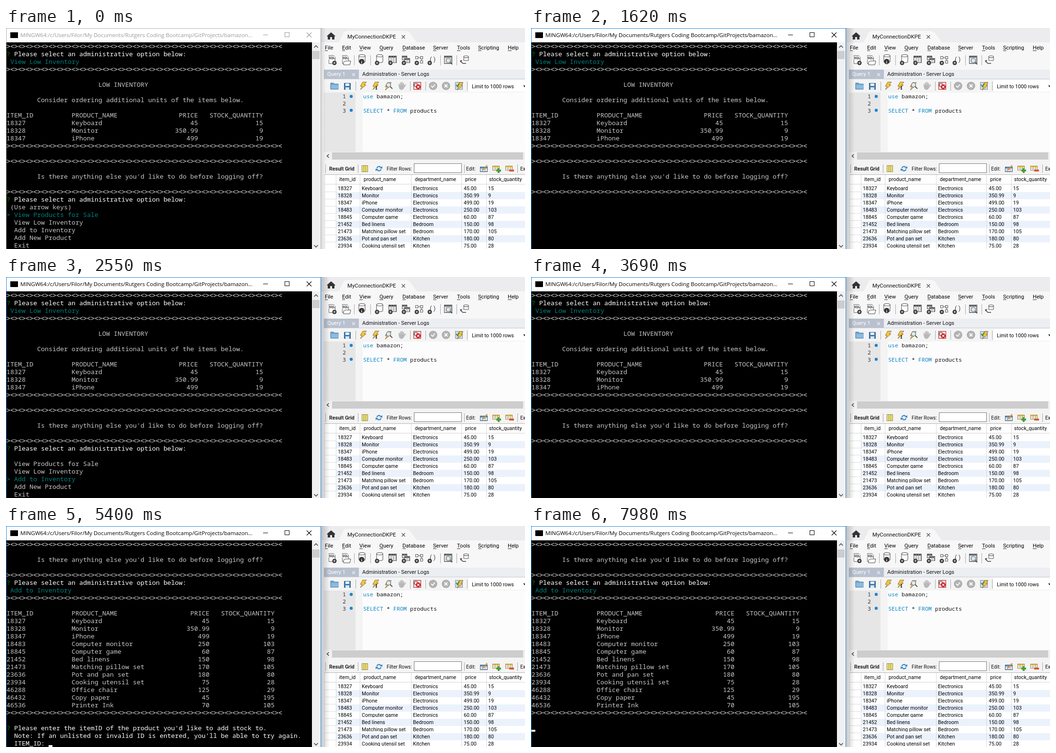
An HTML page with a canvas for the animation above (8 s loop, 1084x462 px).

```html
<!DOCTYPE html>
<html lang="en">
<head>
<meta charset="utf-8">
<title>Inventory console</title>
<style>
html, body { margin: 0; width: 100%; height: 100%; overflow: hidden; background: #fff; }
canvas { display: block; }
</style>
</head>
<body>
<canvas id="stage" width="1084" height="462"></canvas>
<script>
const W = 1084, H = 462, LOOP = 8000;
const stage = document.getElementById('stage').getContext('2d');
let c = stage;

const UI = '11.15px Roboto, sans-serif';
const GRID = '10.6px Roboto, sans-serif';
const CODE = '11.67px "Noto Sans Mono", monospace';
const TERM = '500 13.333px "Noto Sans Mono", monospace';
const RULE = '13.29px "DejaVu Sans Mono", monospace';
const GREY = '#c8c8c8', WHITE = '#fff', TEAL = '#008080', GREEN = '#008000';

const items = [
  ['18327', 'Keyboard', 'Electronics', '45', '15'],
  ['18328', 'Monitor', 'Electronics', '350.99', '9'],
  ['18347', 'iPhone', 'Electronics', '499', '19'],
  ['18483', 'Computer monitor', 'Electronics', '250', '103'],
  ['18845', 'Computer game', 'Electronics', '60', '87'],
  ['21452', 'Bed linens', 'Bedroom', '150', '98'],
  ['21473', 'Matching pillow set', 'Bedroom', '170', '105'],
  ['23636', 'Pot and pan set', 'Kitchen', '180', '80'],
  ['23934', 'Cooking utensil set', 'Kitchen', '75', '28'],
  ['46288', 'Office chair', 'Office', '125', '29'],
  ['46432', 'Copy paper', 'Office', '45', '195'],
  ['46536', 'Printer Ink', 'Office', '70', '105']
];
const options = ['View Products for Sale', 'View Low Inventory', 'Add to Inventory', 'Add New Product', 'Exit'];

function rect(x, y, w, h, fill) { c.fillStyle = fill; c.fillRect(x, y, w, h); }
function box(x, y, w, h, stroke, fill) {
  if (fill) rect(x, y, w, h, fill);
  c.strokeStyle = stroke; c.lineWidth = 1;
  c.strokeRect(x + .5, y + .5, w - 1, h - 1);
}
function text(s, x, y, font, fill) { c.font = font; c.fillStyle = fill; c.fillText(s, x, y); }
function line(points, stroke, width = 1) {
  c.strokeStyle = stroke; c.lineWidth = width; c.beginPath();
  points.forEach(([x, y], i) => i ? c.lineTo(x, y) : c.moveTo(x, y));
  c.stroke();
}
function poly(points, fill, stroke) {
  c.beginPath();
  points.forEach(([x, y], i) => i ? c.lineTo(x, y) : c.moveTo(x, y));
  c.closePath(); c.fillStyle = fill; c.fill();
  if (stroke) { c.strokeStyle = stroke; c.lineWidth = 1; c.stroke(); }
}
function disc(x, y, r, fill, stroke) {
  c.beginPath(); c.arc(x, y, r, 0, 7);
  if (fill) { c.fillStyle = fill; c.fill(); }
  if (stroke) { c.strokeStyle = stroke; c.lineWidth = 1.2; c.stroke(); }
}
function cross(x, y, r, stroke, width = 1) {
  line([[x - r, y - r], [x + r, y + r]], stroke, width);
  line([[x + r, y - r], [x - r, y + r]], stroke, width);
}
function divider(x, y, h) { rect(x, y, 1, h, '#a9a9a9'); }

// Toolbar icons, each centred on x, y
function badge(x, y) {
  disc(x, y, 4.5, '#333');
  rect(x - 2.5, y - .5, 5, 1, WHITE); rect(x - .5, y - 2.5, 1, 5, WHITE);
}
function sheet(x, y) {
  poly([[x - 6.5, y - 9.5], [x + 3.5, y - 9.5], [x + 6.5, y - 6.5], [x + 6.5, y + 7.5], [x - 6.5, y + 7.5]], WHITE, '#666');
  rect(x - 8, y - 8, 14, 7, '#f7f7f8');
  text('SQL', x - 7, y - 2, 'bold 7px Roboto, sans-serif', '#333');
}
function cylinder(x, y) {
  rect(x - 6, y - 7, 13, 13, WHITE);
  c.strokeStyle = '#555'; c.lineWidth = 1.1;
  c.beginPath(); c.ellipse(x + .5, y - 7, 6.5, 2.5, 0, 0, 7); c.stroke();
  c.beginPath(); c.moveTo(x - 6, y - 7); c.lineTo(x - 6, y + 5);
  c.ellipse(x + .5, y + 5, 6.5, 2.5, 0, Math.PI, 0, true); c.lineTo(x + 7, y - 7); c.stroke();
}
function table(x, y, w, h, head, edge) {
  box(x, y, w, h, edge, WHITE);
  rect(x + 1, y + 1, w - 2, 3, head);
  for (let j = 6; j < h - 1; j += 3) rect(x + 1, y + j, w - 2, 1, '#aaa');
  for (let i = 5; i < w - 1; i += 5) rect(x + i, y + 1, 1, h - 2, '#999');
}
function bolt(x, y) {
  poly([[x - 1, y - 8], [x + 7, y - 8], [x + 2, y - 2], [x + 6, y - 2], [x - 6, y + 8], [x - 2, y + 1], [x - 6, y + 1]], '#f8c537', '#8a7340');
}
function lens(x, y) {
  disc(x, y, 4.5, '#d8ecf8', '#666');
  line([[x + 3, y + 3], [x + 8, y + 8]], '#555', 2);
}
function refresh(x, y) {
  c.strokeStyle = '#2f83c5'; c.lineWidth = 2.2;
  c.beginPath(); c.arc(x, y, 4.5, 3.4, 5.5); c.stroke();
  c.beginPath(); c.arc(x, y, 4.5, .3, 2.4); c.stroke();
  poly([[x + 1, y - 1], [x + 7, y - 5], [x + 7, y]], '#2f83c5');
  poly([[x - 1, y + 1], [x - 7, y + 5], [x - 7, y]], '#2f83c5');
}

function drawHeader() {
  rect(658, 0, 426, 30, '#ececef');
  poly([[695, 30], [706, 8], [712, 6], [836, 6], [843, 9], [858, 30]], '#f7f7f8');
  poly([[670, 17], [679, 9], [688, 17], [686, 18], [686, 24], [681, 24], [681, 19], [677, 19], [677, 24], [672, 24], [672, 18]], '#333');
  text('MyConnectionDKPE', 713, 22, '11.4px Roboto, sans-serif', '#111');
  cross(830, 18.5, 3.5, '#555', 1.2);

  rect(664, 30, 420, 57, '#f7f7f8');
  const menu = { File: 666, Edit: 702, View: 738, Query: 780, Database: 828, Server: 892, Tools: 942, Scripting: 986, Help: 1048 };
  for (const [name, x] of Object.entries(menu)) {
    text(name, x, 45, UI, '#000');
    rect(x, 47, Math.round(c.measureText(name[0]).width), 1, '#333');
  }

  sheet(681, 67); badge(686, 73);
  sheet(709, 67);
  poly([[705, 71], [709, 69], [720, 69], [718, 77], [705, 77]], WHITE, '#444');
  [727, 761, 907, 941].forEach(x => divider(x, 57, 21));
  cylinder(743, 65); disc(743, 70, 5.5, '#333');
  text('i', 741.6, 74, 'bold 9px Liberation Serif, serif', WHITE);
  cylinder(780, 65); badge(775, 73);
  table(799, 58, 17, 15, '#555', '#555'); badge(803, 73);
  table(827, 58, 11, 9, '#666', '#555'); table(832, 63, 12, 10, '#666', '#555'); badge(831, 73);
  [[855, 59], [865, 59], [865, 68]].forEach(([x, y]) => box(x, y, 6, 6, '#555', WHITE));
  line([[861, 62], [865, 62]], '#555'); line([[868, 65], [868, 68]], '#555'); badge(858, 73);
  text('( )', 885, 70, '13px Roboto, sans-serif', '#444'); badge(885, 73);
  table(915, 58, 17, 17, '#666', '#555'); lens(924, 68);
  c.strokeStyle = '#555'; c.lineWidth = 1.1;
  c.beginPath(); c.ellipse(961, 60, 5, 2, 0, 0, 7); c.stroke();
  line([[956, 60], [956, 68], [966, 68], [966, 60]], '#555');
  line([[950, 70], [954, 74], [961, 74]], '#444', 1.6);
  poly([[948, 68], [953, 67], [950, 72]], '#444');
}

function drawEditor() {
  rect(664, 87, 420, 20, '#eceef2');
  rect(664, 87, 73, 19, '#b9c1cf');
  text('Query 1', 671, 100, UI, WHITE);
  cross(726, 97.5, 3, '#eef0f4', 1.2);
  text('Administration - Server Logs', 744, 100, UI, '#111');
  rect(664, 106, 420, 29, '#f4f4f5');
  rect(664, 106, 420, 1, '#c9cdd5');

  poly([[678, 115], [684, 115], [686, 117], [694, 117], [694, 128], [678, 128]], '#6fa6cf', '#4c7fa8');
  rect(679, 119, 15, 8, '#8bbcdf');
  box(706, 115, 14, 14, '#2d5f8c', '#3f7eb3');
  rect(709, 116, 8, 5, WHITE); rect(709, 124, 8, 5, '#d8e6f0');
  [730, 844, 876, 963].forEach(x => divider(x, 112, 19));
  bolt(746, 121);
  bolt(772, 121); text('I', 771, 129, 'bold 13px Liberation Serif, serif', '#333');
  bolt(798, 122); lens(799, 119);
  c.lineCap = 'round';
  [[821, 118], [824, 115], [827, 114], [830, 116]].forEach(([x, y]) => line([[x, y], [x + .5, 123]], '#b8b8b8', 2.4));
  line([[834, 119], [830, 125]], '#b8b8b8', 2.4);
  c.lineCap = 'butt';
  disc(826, 124, 5.2, '#b8b8b8');
  box(851, 113, 16, 16, '#a22', '#f5dcdc');
  disc(856, 119, 3.5, null, '#444'); disc(861, 123, 5, '#d3222a');
  cross(861, 123, 2, WHITE, 1.4);
  disc(892, 121, 8, '#b5b5b5', '#9b9b9b');
  line([[888, 121], [891, 124], [896, 118]], WHITE, 1.8);
  disc(919, 121, 8, '#b5b5b5', '#9b9b9b'); cross(919, 121, 3, WHITE, 1.8);
  box(938, 113, 16, 16, '#8796a5', '#c6d8e6'); bolt(948, 122);
  line([[940, 119], [943, 122], [947, 116]], '#3d7f39', 1.8);
  rect(966, 109, 118, 24, WHITE);
  text('Limit to 1000 rows', 973, 126, '10.6px Roboto, sans-serif', '#000');
  poly([[1080, 120], [1087, 120], [1083.5, 124]], '#333');

  rect(664, 135, 420, 125, '#fcfcfc');
  rect(664, 135, 66, 124, '#e6e6e6');
  rect(730, 135, 15, 124, '#f4f4f4');
  ['1', '2', '3'].forEach((n, i) => text(n, 703, 147 + 15 * i, CODE, '#333'));
  disc(721, 143, 3.2, '#1c86d1'); disc(721, 172, 3.2, '#1c86d1');
  const code = (s, col, row, fill) => text(s, 746 + 7 * col, 147 + 15 * row, CODE, fill);
  code('use', 0, 0, '#0b84c6'); code('bamazon;', 4, 0, '#111');
  code('SELECT', 0, 2, '#0b84c6'); code('*', 7, 2, '#111');
  code('FROM', 9, 2, '#0b84c6'); code('products', 14, 2, '#111');

  rect(664, 259, 420, 17, '#f0f0f0');
  rect(681, 260, 399, 15, '#cdcdcd');
  line([[674.5, 264], [670.5, 267.5], [674.5, 271]], '#444', 1.6);
}

function drawResults() {
  rect(664, 276, 420, 30, '#f4f4f5');
  [667, 735, 957, 1068].forEach(x => divider(x, 285, 18));
  text('Result Grid', 675, 298, 'bold 10.6px Roboto, sans-serif', '#222');
  box(743, 287, 13, 14, '#8c8c46', '#f3e27a');
  rect(747, 288, 1, 12, '#8c8c46'); rect(751, 288, 1, 12, '#8c8c46');
  refresh(779, 294);
  text('Filter Rows:', 795, 298, '10.2px Roboto, sans-serif', '#111');
  box(852, 283, 100, 20, '#7a7a7a', WHITE);
  text('Edit:', 961, 298, '10.2px Roboto, sans-serif', '#111');
  table(990, 290, 16, 11, '#4e94c7', '#356b94');
  line([[995, 298], [1005, 287]], '#e38b32', 2.5);
  [1016, 1043].forEach((x, i) => {
    table(x, 288, 15, 10, '#f1c94a', '#a5853a');
    rect(x + 8, 296, 10, 4, i ? '#d8582a' : '#4d9c35');
    if (!i) rect(x + 11, 293, 4, 10, '#4d9c35');
  });
  text('Ex', 1074, 298, '10.2px Roboto, sans-serif', '#111');

  rect(664, 306, 420, 156, WHITE);
  rect(665, 306, 419, 1, '#b5b5b5');
  rect(665, 326, 419, 1, '#d5d5d5');
  const head = { item_id: 696, product_name: 747, department_name: 854, price: 959, stock_quantity: 1009 };
  for (const [name, x] of Object.entries(head)) text(name, x, 320, GRID, '#000');
  items.slice(0, 9).forEach(([id, name, dept, price, stock], i) => {
    const y = 328 + 15 * i;
    if (i % 2) rect(690, y, 394, 15, '#ebf2fc');
    rect(665, y + 14, 24, 1, '#dedede');
    // Rows are too low for descenders
    c.save();
    c.beginPath(); c.rect(664, y, 420, 12); c.clip();
    const cells = [id, name, dept, (+price).toFixed(2), stock];
    [693, 743, 850, 956, 1007].forEach((x, k) => text(cells[k], x, y + 11, GRID, '#000'));
    c.restore();
  });
  [665, 689, 739, 846, 951, 1003].forEach(x => rect(x, 307, 1, 155, '#d9d9d9'));
}

// The database window never changes, so it is painted once
const backdrop = document.createElement('canvas');
backdrop.width = W; backdrop.height = H;
function paintBackdrop() {
  c = backdrop.getContext('2d');
  rect(0, 0, W, H, '#f7f7f8');
  drawHeader(); drawEditor(); drawResults();
  c = stage;
}

function put(s, col, row, fill = GREY, font = TERM) { text(s, 1 + 8 * col, 43 + 16 * row, font, fill); }
function right(s, end, row) { put(s, end - s.length, row); }
function rule(row) { put('><'.repeat(36), 0, row, GREY, RULE); }
function ask(s, row) { put('?', 0, row, GREEN); put(s, 2, row, WHITE); }
function cursor(col, row) { rect(1 + 8 * col, 42 + 16 * row, 8, 4, WHITE); }

function stock(list, priceEnd, qtyEnd) {
  const rows = [['ITEM_ID', 'PRODUCT_NAME', '', 'PRICE', 'STOCK_QUANTITY'], ...list];
  rows.forEach(([id, name, , price, qty], i) => {
    put(id, 0, 9 + i); put(name, 17, 9 + i);
    right(price, priceEnd, 9 + i); right(qty, qtyEnd, 9 + i);
  });
  rule(9 + rows.length);
}

const QUESTION = 'Please select an administrative option below:';
const FAREWELL = "Is there anything else you'd like to do before logging off?";

function lowStockScreen(t) {
  rule(0); ask(QUESTION, 1);
  put('View Low Inventory', 1, 2, TEAL);
  rule(3);
  put('LOW INVENTORY', 24, 5);
  put('Consider ordering additional units of the items below.', 8, 7);
  stock(items.slice(0, 3), 50, 67);
  rule(15); put(FAREWELL, 8, 17); rule(19);

  // Every key press clears the menu for 30 ms, then redraws it
  const keys = [1620, 1860, 2190, 2520, 3690];
  if (keys.some(k => t >= k && t < k + 30)) return;
  const chosen = [0, 1, 2, 3, 2][keys.filter(k => t >= k).length];
  ask(QUESTION, 20);
  if (t < keys[0]) put('(Use arrow keys)', 1, 21);
  options.forEach((name, i) => {
    const on = i === chosen;
    if (on) put('>', 0, 22 + i, TEAL);
    put(name, 2, 22 + i, on ? TEAL : GREY);
  });
}

function addStockScreen(t) {
  rule(0); put(FAREWELL, 8, 2); rule(4);
  ask(QUESTION, 5);
  put('Add to Inventory', 1, 6, TEAL);
  rule(7);
  stock(items, 53, 70);

  if (t >= 7950 || (t >= 7140 && t < 7170)) { cursor(0, 24); return; }
  ask("Please enter the itemID of the product you'd like to add stock to.", 24);
  put("Note: If an unlisted or invalid ID is entered, you'll be able to try again.", 2, 25, WHITE);
  const typed = t < 7170 ? '' : t < 7590 ? '1' : '18';
  put('ITEM_ID: ' + typed, 2, 26, WHITE);
  const lit = t < 7140 ? Math.floor((t - 3360) / 510) % 2 === 0 : t < 7440 || t >= 7590;
  if (lit) cursor(11 + typed.length, 26);
}

function drawConsole(t) {
  const active = t >= 840;
  const ink = active ? '#000' : '#999';
  const edge = active ? '#1883d7' : '#aaa';
  const shade = c.createLinearGradient(658, 0, active ? 676 : 668, 0);
  shade.addColorStop(0, active ? 'rgba(0,0,0,.2)' : 'rgba(0,0,0,.12)');
  shade.addColorStop(1, 'rgba(0,0,0,0)');
  rect(658, 0, 20, H, shade);

  rect(0, 0, 658, H, WHITE);
  rect(1, 30, 638, 432, '#000');
  rect(9, 9, 16, 12, '#000');
  text('MINGW64:/c/Users/Filor/My Documents/Rutgers Coding Bootcamp/GitProjects/bamazon...', 30, 19, '11.53px "Open Sans", sans-serif', ink);
  rect(537, 14, 10, 1, ink);
  box(582, 9, 10, 10, ink);
  cross(633, 14.5, 5, ink, 1.1);

  rect(639, 30, 17, 432, '#f0f0f0');
  rect(640, t < 3690 ? 48 : 49, 15, 17, '#cdcdcd');
  line([[643.5, 41], [647.5, 37], [651.5, 41]], '#505050', 1.7);
  line([[643.5, 454], [647.5, 458], [651.5, 454]], '#505050', 1.7);

  if (t < 3720) lowStockScreen(t); else addStockScreen(t);
  rect(0, 0, 1, H, edge); rect(0, 0, 658, 1, edge); rect(657, 0, 1, H, edge);
}

const start = performance.now();
function frame() {
  const t = (performance.now() - start) % LOOP;
  c.drawImage(backdrop, 0, 0);
  drawConsole(t);
  requestAnimationFrame(frame);
}
paintBackdrop();
frame();
</script>
</body>
</html>
```
